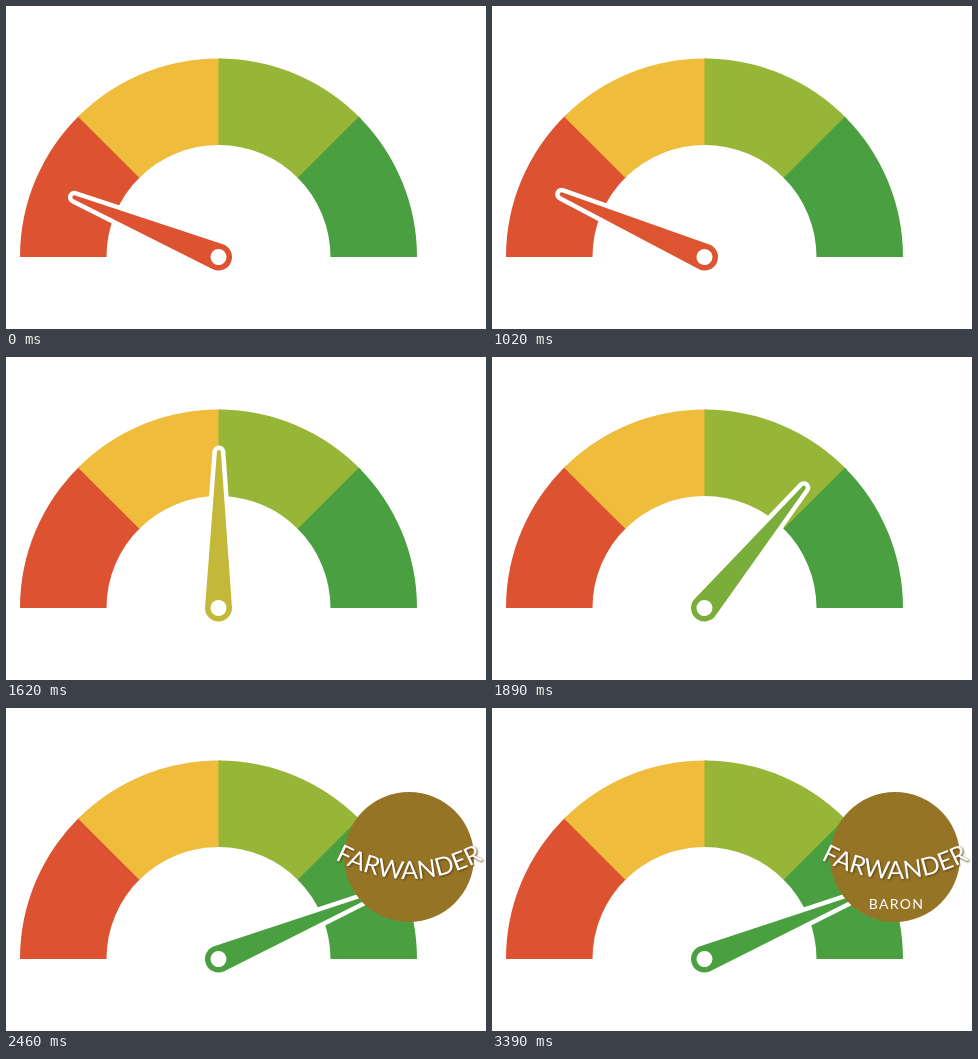
Recreate the animation shown at these times as an HTML page. Size 480 by 323 pixels, loop 3.6 s.

```html
<!DOCTYPE html>
<html lang="en">
<head>
<meta charset="utf-8">
<title>Gauge</title>
<style>
  html, body { margin: 0; width: 100%; height: 100%; overflow: hidden; background: #fff; }
  svg { display: block; width: 480px; height: 323px; }
  text { font-family: Lato, sans-serif; fill: #fff; text-anchor: middle; }
</style>
</head>
<body>
<svg viewBox="0 0 480 323">
  <g transform="translate(212.5 251)">
    <g id="zones" fill="none" stroke-width="86.5"></g>
    <g id="needle">
      <path d="M-156 -2 L0 -13.5 A13.5 13.5 0 0 1 0 13.5 L-156 2 A2 2 0 0 1 -156 -2Z"
            stroke="#fff" stroke-width="9" stroke-linejoin="round" paint-order="stroke"/>
      <circle r="8" fill="#fff"/>
    </g>
  </g>
  <g id="badge">
    <circle r="65" fill="#967425"/>
    <path id="curve" d="M-84 -3 Q0 47 84 -3" fill="none"/>
    <text font-size="25" style="filter: drop-shadow(1px 1px 1px #5a4010)">
      <textPath href="#curve" startOffset="50%">FARWANDER</textPath>
    </text>
    <text id="subtitle" x="1.5" y="52" font-size="14" letter-spacing="1.3">BARON</text>
  </g>
</svg>
<script>
const LOOP = 3600, LOW = 22.5, HIGH = 157.5;
const SWEEP_START = 940, SWEEP_END = 2300;
const COLORS = [[221, 82, 48], [239, 188, 60], [151, 181, 54], [74, 160, 64]];
const el = id => document.getElementById(id);
const rgb = c => `rgb(${c.map(Math.round)})`;
const clamp = (v, lo, hi) => Math.min(hi, Math.max(lo, v));
const progress = (t, from, to) => clamp((t - from) / (to - from), 0, 1);
const easeInOut = p => (1 - Math.cos(Math.PI * p)) / 2;
const easeOut = p => 1 - (1 - p) ** 2;

// Each zone runs slightly under the next one to hide the seam.
el('zones').innerHTML = COLORS.map((c, i) =>
  `<circle r="155.25" pathLength="8" stroke-dasharray="${i < 3 ? 1.02 : 1} 7" stroke="${rgb(c)}" transform="rotate(${180 + 45 * i})"/>`
).join('');

// Blends between the colours at the middle of each zone.
function colorAt(angle) {
  const pos = clamp((angle - 22.5) / 45, 0, 3);
  const i = Math.min(2, Math.floor(pos));
  return rgb(COLORS[i].map((v, k) => v + (COLORS[i + 1][k] - v) * (pos - i)));
}

function needleAngle(t) {
  const dip = 3 * easeInOut(2 * progress(t, 0, SWEEP_START));
  return LOW - dip + (HIGH - LOW) * easeInOut(progress(t, SWEEP_START, SWEEP_END));
}

function draw() {
  const t = performance.now() % LOOP;
  const angle = needleAngle(t);
  el('needle').setAttribute('transform', `rotate(${angle})`);
  el('needle').setAttribute('fill', colorAt(angle));
  const scale = easeOut(progress(t, 2160, 2400));
  el('badge').setAttribute('transform', `translate(403 149) scale(${scale})`);
  el('badge').setAttribute('visibility', scale > 0 ? 'visible' : 'hidden');
  el('subtitle').setAttribute('opacity', progress(t, 2760, 3000));
  requestAnimationFrame(draw);
}
draw();
</script>
</body>
</html>
```
